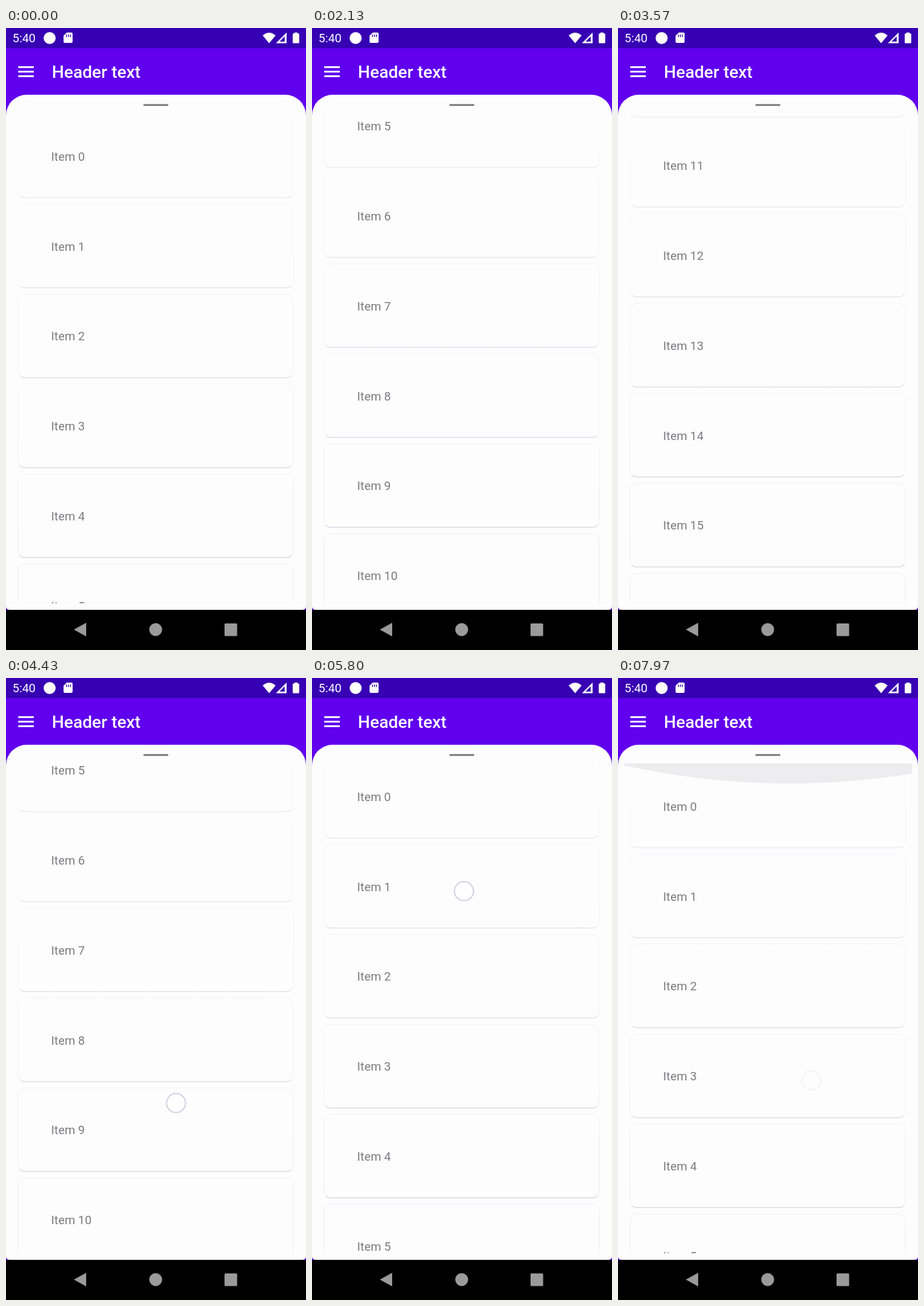
An HTML page that plays this animation: 464 by 960 pixels, repeating every 8000 ms.

```html
<!DOCTYPE html>
<html lang="en">
<head>
<meta charset="utf-8">
<title>Scrolling sheet</title>
<style>
html, body { margin: 0; width: 100%; height: 100%; overflow: hidden; background: #000; }
svg { display: block; width: 464px; height: 960px; font-family: Roboto, sans-serif; }
.list, #touch, #glow { animation: 8s linear infinite; }
.list { animation-name: scroll; }
#touch { animation-name: touch; }
#glow { animation-name: glow; }

/* Drags run linearly; flings slow down after release. */
@keyframes scroll {
  0%, 11.4% { transform: translateY(0); }
  12.875%, 13.3% { transform: translateY(-104px); }
  14% { transform: translateY(-221px); animation-timing-function: cubic-bezier(.2, .5, .35, 1); }
  26%, 31.2% { transform: translateY(-741px); }
  33.5% { transform: translateY(-990px); animation-timing-function: cubic-bezier(.2, .5, .35, 1); }
  43.5%, 46.6% { transform: translateY(-1513px); }
  49% { transform: translateY(-1270px); animation-timing-function: cubic-bezier(.2, .5, .35, 1); }
  54.4% { transform: translateY(-831px); }
  55.375%, 55.8% { transform: translateY(-750px); }
  56.4% { transform: translateY(-666px); animation-timing-function: cubic-bezier(.2, .5, .35, 1); }
  68%, 71% { transform: translateY(-94px); }
  72.5%, 73.4% { transform: translateY(-15px); }
  74%, 100% { transform: translateY(0); }
}
@keyframes touch {
  0%, 10.9% { transform: translate(332px, 690px); opacity: 0; }
  11.25% { transform: translate(332px, 690px); opacity: 1; }
  12.875%, 13.3% { transform: translate(332px, 577px); opacity: 1; }
  14% { transform: translate(334px, 460px); opacity: 1; }
  14.5% { transform: translate(334px, 450px); opacity: 0; }
  30.6% { transform: translate(320px, 690px); opacity: 0; }
  31% { transform: translate(320px, 690px); opacity: 1; }
  33.5% { transform: translate(325px, 430px); opacity: 1; }
  34% { transform: translate(325px, 420px); opacity: 0; }
  46.1% { transform: translate(255px, 430px); opacity: 0; }
  46.5% { transform: translate(255px, 430px); opacity: 1; }
  49% { transform: translate(262px, 680px); opacity: 1; }
  49.5% { transform: translate(262px, 690px); opacity: 0; }
  54% { transform: translate(258px, 575px); opacity: 0; }
  54.4% { transform: translate(258px, 575px); opacity: 1; }
  55.375%, 55.8% { transform: translate(263px, 656px); opacity: 1; }
  56.4% { transform: translate(266px, 740px); opacity: 1; }
  56.8% { transform: translate(266px, 750px); opacity: 0; }
  70.6% { transform: translate(232px, 250px); opacity: 0; }
  71% { transform: translate(232px, 250px); opacity: 1; }
  72.5%, 73.4% { transform: translate(235px, 329px); opacity: 1; }
  80%, 83% { transform: translate(245px, 640px); opacity: 1; }
  83.5% { transform: translate(245px, 640px); opacity: 0; }
  94.3% { transform: translate(290px, 330px); opacity: 0; }
  94.75% { transform: translate(290px, 330px); opacity: 1; }
  99% { transform: translate(299px, 621px); opacity: 1; }
  99.5%, 100% { transform: translate(299px, 621px); opacity: .22; }
}
@keyframes glow {
  0%, 74% { transform: translateY(-31px); opacity: 0; }
  80%, 83% { transform: translateY(0); opacity: 1; }
  91%, 95% { transform: translateY(-31px); opacity: 0; }
  99%, 100% { transform: translateY(0); opacity: 1; }
}
</style>
</head>
<body>
<svg viewBox="0 0 464 960">
  <defs>
    <clipPath id="viewport"><rect x="9" y="132" width="446" height="756"/></clipPath>
    <linearGradient id="depth" x1="0" y1="0" x2="0" y2="1">
      <stop offset="0" stop-color="#fff" stop-opacity=".35"/>
      <stop offset="1" stop-color="#fff"/>
    </linearGradient>
    <!-- Card shadows deepen toward the bottom of the screen. -->
    <mask id="light" maskUnits="userSpaceOnUse" x="0" y="132" width="464" height="756">
      <rect y="132" width="464" height="756" fill="url(#depth)"/>
    </mask>
  </defs>

  <rect width="464" height="898" fill="#6000ee"/>
  <rect width="464" height="31" fill="#3700b3"/>

  <g fill="#fff">
    <text x="10" y="22.4" font-size="18.5">5:40</text>
    <circle cx="67.5" cy="15.5" r="9.3"/>
    <path d="M94 7h7q2 0 2 2v12q0 2-2 2H91q-2 0-2-2V12z"/>
    <path d="M397 11.5Q407 3 417 11.5L407 23.5z"/>
    <path d="M434 7V23.5H417.5z"/>
    <path d="M446 8.500V7h5v1.500h1.500q1 0 1 1V22.500q0 1-1 1h-8q-1 0-1-1V9.500q0-1 1-1z"/>
    <path d="M19 59h24v2.700H19zM19 66h24v2.700H19zM19 73h24v2.700H19z"/>
    <text x="71" y="77.2" font-size="26.4" font-weight="500">Header text</text>
  </g>
  <path d="M93.500 10v4M96.500 10v4M99.500 10v4" stroke="#3700b3" stroke-width="1.200"/>
  <path d="M431 13v8h-8z" fill="#3700b3"/>

  <path d="M0 135A32 32 0 0 1 32 103H432A32 32 0 0 1 464 135V893A5 5 0 0 1 459 898H5A5 5 0 0 1 0 893z" fill="#fdfdfe"/>
  <rect x="212.500" y="117.500" width="38.500" height="2.700" rx="1" fill="#77777a"/>

  <g clip-path="url(#viewport)">
    <g mask="url(#light)"><g id="cards" class="list" fill="none"></g></g>
    <g id="labels" class="list" font-size="18.5" fill="#7c7c7e"></g>
    <circle id="glow" cx="265" cy="-1007" r="1170" fill="#505058" fill-opacity=".09"/>
  </g>

  <circle id="touch" r="14.700" fill="#fff" fill-opacity=".4" stroke="#d2d2e2" stroke-width="2"/>

  <g fill="#9a9a9a">
    <path d="M105 928.500L124 918V939z"/>
    <circle cx="231.500" cy="928.500" r="10"/>
    <rect x="338" y="919" width="19.500" height="19.500" rx="1.500"/>
  </g>
</svg>
<script>
const PITCH = 138.85, COUNT = 20;

const card = y => `
  <g transform="translate(0 ${y})">
    <rect x="18.500" y="133" width="426" height="129" rx="10" stroke="#efeff3"/>
    <path d="M21 258.500Q24 262 29 262H434Q439 262 442 258.500" stroke="#d3d3da" stroke-width="1.200"/>
  </g>`;
const label = (y, n) => `<text x="69.800" y="${204.7 + y}">Item ${n}</text>`;

const fill = (id, draw) => {
  document.getElementById(id).innerHTML =
    Array.from({ length: COUNT }, (_, n) => draw(n * PITCH, n)).join('');
};
fill('cards', card);
fill('labels', label);
</script>
</body>
</html>
```
